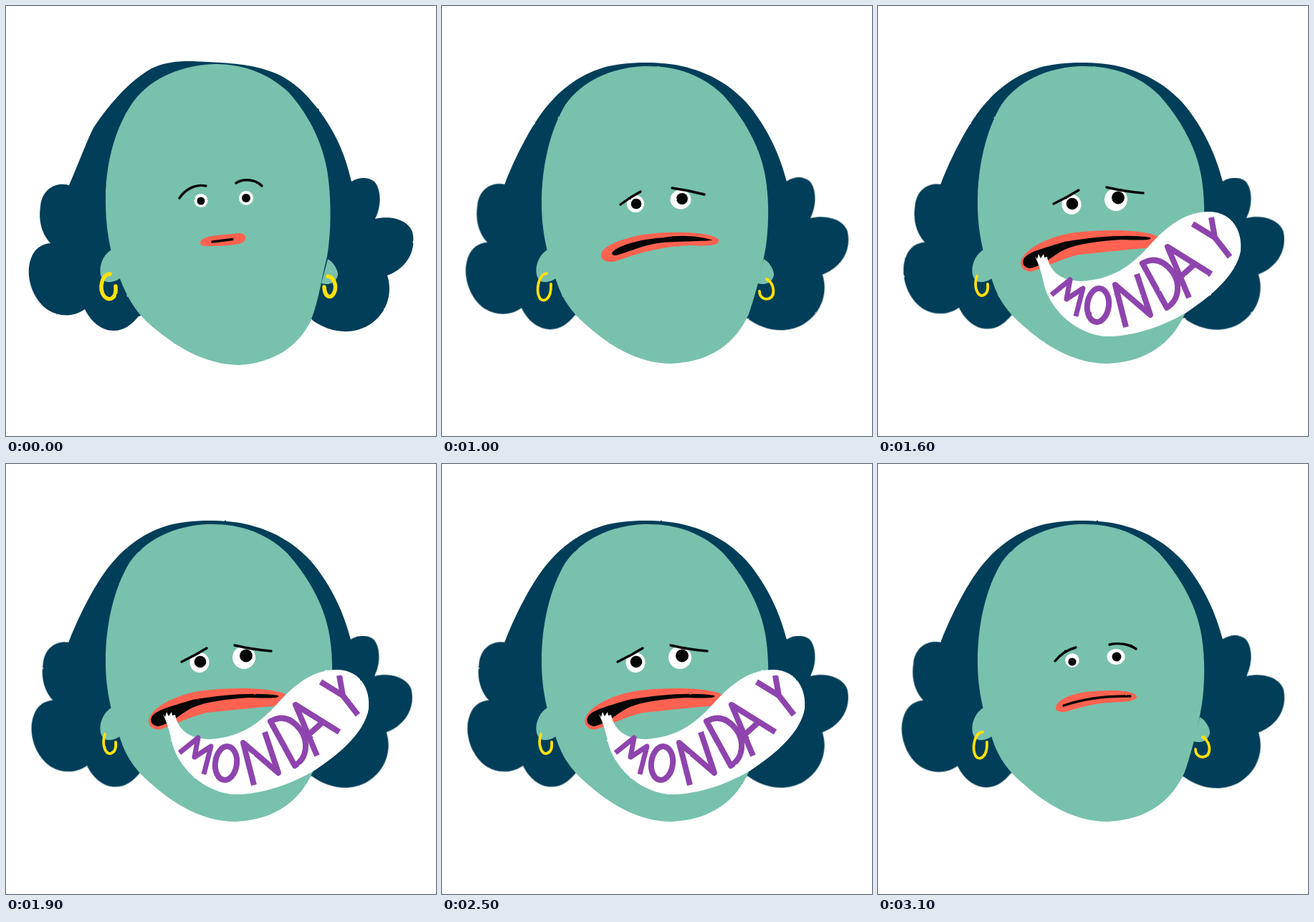
These frames come from a looping animation (600 px wide and 600 px high, 3200 ms). An HTML page without scripts:

```html
<!DOCTYPE html>
<html lang="en">
<head>
<meta charset="utf-8">
<title>Monday face</title>
<style>
  html, body { margin: 0; width: 100%; height: 100%; overflow: hidden; background: #fff; }
  svg { display: block; width: 100%; height: 100%; }

  .hair { fill: #003e59; }
  .skin { fill: #78c1ad; }
  .lips { fill: #ff6250; }
  .white { fill: #fff; }
  .ink { fill: #060606; }
  .line { fill: none; stroke: #060606; stroke-width: 3.4; stroke-linecap: round; }
  .ring { fill: none; stroke: #ffe10a; stroke-width: 3.8; stroke-linecap: round; }
  .thick { stroke-width: 5.5; }
  .letters { fill: none; stroke: #8e44ad; stroke-width: 8; stroke-linejoin: round; }

  /* 32 drawings of 100 ms make one loop */
  .calm, .uneasy, .sad, .talk, .worn, .bubble, .curls { animation: 3.2s step-end infinite; }
  .calm { animation-name: calm; }
  .worn { animation-name: worn; }
  .uneasy { animation-name: uneasy; }
  .sad { animation-name: sad; }
  .talk { animation-name: talk; }
  .bubble { animation-name: blow; transform-origin: 224px 352px; }
  .curls { animation-name: tuck; transform-origin: 300px 300px; }
  .boil { animation: boil .2s step-end infinite; }

  @keyframes calm { 0% { visibility: visible } 28.125%, 100% { visibility: hidden } }
  @keyframes worn { 0% { visibility: hidden } 28.125%, 100% { visibility: visible } }
  @keyframes uneasy {
    0%, 31.25% { visibility: hidden }
    28.125%, 96.875%, 100% { visibility: visible }
  }
  @keyframes sad {
    0%, 34.375%, 96.875%, 100% { visibility: hidden }
    31.25%, 93.75% { visibility: visible }
  }
  @keyframes talk {
    0%, 93.75%, 100% { visibility: hidden }
    34.375% { visibility: visible }
  }
  @keyframes blow {
    0%, 90.625%, 100% { transform: scale(.3) }
    37.5%, 87.5% { transform: scale(.7) }
    40.625% { transform: none }
  }
  @keyframes tuck {
    0%, 100% { transform: none }
    28.125%, 93.75% { transform: translateY(-1px) scale(.995) }
    34.375% { transform: translate(1px, -1px) scale(.99) }
  }
  @keyframes boil {
    0%, 100% { filter: url(#rough1) }
    50% { filter: url(#rough2) }
  }
</style>
</head>
<body>
<svg viewBox="0 0 600 600">
  <defs>
    <filter id="rough1" filterUnits="userSpaceOnUse" x="0" y="0" width="600" height="600" color-interpolation-filters="sRGB">
      <feTurbulence type="fractalNoise" baseFrequency=".12" numOctaves="2" seed="4"/>
      <feDisplacementMap in="SourceGraphic" scale="1.6" xChannelSelector="R" yChannelSelector="G"/>
    </filter>
    <filter id="rough2" filterUnits="userSpaceOnUse" x="0" y="0" width="600" height="600" color-interpolation-filters="sRGB">
      <feTurbulence type="fractalNoise" baseFrequency=".12" numOctaves="2" seed="11"/>
      <feDisplacementMap in="SourceGraphic" scale="1.6" xChannelSelector="R" yChannelSelector="G"/>
    </filter>
  </defs>

  <g class="boil">
    <!-- hair -->
    <path class="hair curls" d="M88 250C70 245 50 255 48 280C45 300 50 318 62 331C50 332 40 338 35 352C26 375 36 410 60 425C75 434 95 434 110 423C118 440 133 453 150 453C165 453 175 445 185 433L300 400L427 438C450 455 480 460 505 446C532 430 540 400 532 376C555 368 574 345 567 315C560 297 535 292 515 297C524 280 524 256 514 245C505 238 492 239 482 245Z"/>
    <path class="hair calm" d="M88 250C95 235 112 190 122 170C140 143 165 112 195 92C215 79 235 77 260 77L300 79C340 82 360 86 385 98C410 112 425 130 440 150C465 185 475 215 482 245L482 260H88Z"/>
    <path class="hair worn" d="M87 250C96 225 115 185 133 158C160 118 190 97 225 86C255 77 305 77 335 84C370 92 400 108 425 135C455 170 472 210 481 245L481 260H87Z"/>

    <!-- head -->
    <path class="skin" d="M147 340C128 352 127 382 141 385C150 386 157 382 161 378L180 350ZM449 353C458 358 464 370 463 376C460 387 450 390 440 387Z"/>
    <path class="skin calm" d="M293 81C250 82 205 97 178 133C160 158 139 205 139 270C139 315 146 345 158 378C168 405 180 425 198 442C235 474 275 500 325 501C375 498 408 474 425 440C437 410 440 380 448 350C454 315 454 270 449 235C443 195 425 155 395 121C370 97 335 81 293 81Z"/>
    <path class="skin worn" d="M282 84C235 86 195 105 172 138C150 175 139 225 139 275C139 318 148 350 160 385C168 410 182 428 199 443C232 473 273 499 320 499C375 497 410 470 428 430C438 400 446 370 452 335C457 300 456 260 450 232C443 195 420 155 392 124C362 95 325 83 282 84Z"/>

    <g class="calm">
      <path class="ring thick" d="M145 374C134 374 129 394 137 405C144 413 155 408 153 391M449 377C457 378 461 388 459 397C456 409 445 409 444 392"/>
      <circle class="white" cx="272" cy="271.500" r="9.500"/>
      <circle class="white" cx="335" cy="268" r="10"/>
      <circle class="ink" cx="272" cy="272" r="5.500"/>
      <circle class="ink" cx="335" cy="268" r="6"/>
      <path class="line" d="M242 268C250 256 264 248 279 251M321 247C332 240 348 242 357 251"/>
      <path class="lips" d="M271 330C272 324 282 321 295 320L325 317C337 317 337 328 328 331C315 335 290 335 280 335C273 335 271 333 271 330Z"/>
      <path class="line" d="M288 329L316 325.500"/>
    </g>

    <g class="uneasy">
      <path class="ring" d="M146 374C134 375 131 397 136 407C141 415 153 410 152 388M453 381C462 386 465 398 460 406C453 412 443 408 443 398"/>
      <circle class="white" cx="271" cy="274" r="9.800"/>
      <ellipse class="white" cx="332" cy="269" rx="12.500" ry="11"/>
      <circle class="ink" cx="271" cy="276" r="5.600"/>
      <circle class="ink" cx="333" cy="269" r="6.500"/>
      <path class="line" d="M247 275Q258 261 276 256M323 252C335 249 350 251 360 258"/>
      <path class="lips" d="M248 340C249 330 265 322 290 318C320 315 355 314 361 324C362 332 340 332 320 333C295 335 275 342 260 346C251 346 248 344 248 340Z"/>
      <path class="line" d="M259 337Q300 323 352 324"/>
    </g>

    <g class="sad">
      <path class="ring" d="M146 373C134 375 131 397 136 407C141 415 153 410 152 388M453 381C462 386 465 398 460 406C453 412 443 408 443 398"/>
      <circle class="white" cx="270" cy="276" r="12"/>
      <ellipse class="white" cx="333" cy="270" rx="14.500" ry="13.500"/>
      <circle class="ink" cx="271" cy="276" r="7.300"/>
      <circle class="ink" cx="335" cy="269" r="8"/>
      <path class="line" d="M249 277Q262 267 277 259M321 254Q344 257 366 263"/>
      <path class="lips" d="M222 348C222 335 250 325 280 319C320 313 378 315 386 326C388 335 370 335 345 334C310 335 280 343 245 355C232 360 222 355 222 348Z"/>
      <path class="ink" d="M238 343C250 332 280 325 310 323C335 318 365 322 378 327C350 329 315 328 295 332C275 336 255 345 243 348C238 348 236 346 238 343Z"/>
    </g>

    <g class="talk">
      <path class="ring" d="M138 377C133 392 139 405 146 404C152 402 154 396 153 388M452 381C460 386 463 396 458 402C452 407 444 404 444 397"/>
      <ellipse class="white" cx="270" cy="277" rx="13.500" ry="14"/>
      <circle class="white" cx="332" cy="270" r="16"/>
      <circle class="ink" cx="271" cy="276" r="8.300"/>
      <circle class="ink" cx="335" cy="267.500" r="9"/>
      <path class="line" d="M245 276Q264 267 280 257M319 253Q345 259 370 261"/>
      <path class="lips" d="M199 358C202 340 235 322 275 316C320 311 365 312 388 320C396 328 393 335 383 337C355 339 310 344 280 347C255 353 235 364 216 370C206 372 199 366 199 358Z"/>
      <path class="ink" d="M203 354C207 343 235 337 260 329C300 322 350 318 380 323C383 327 370 327 340 326C310 328 280 331 260 340C245 347 232 362 212 366C204 365 201 360 203 354Z"/>
      <g class="bubble" role="img" aria-label="MONDAY">
        <path class="white" d="M219 349l3 4l2-7l3 6l4-6l1 5l4-1C240 370 255 384 285 384C325 381 350 366 378 335C405 305 430 287 463 287C495 288 509 315 506 342C500 375 465 405 430 428C395 448 355 462 315 461C270 455 240 420 232 390C228 372 225 362 219 349Z"/>
        <g class="letters">
          <path stroke-width="7" d="M242 403L268 382L263 409L286 394L276 433"/>
          <ellipse cx="307" cy="417.500" rx="15" ry="23.500" transform="rotate(7 307 417.500)"/>
          <path d="M346 448L331 389L380 431L361 374"/>
          <path d="M369 359L403 421C421 410 422 387 411 371C399 355 385 350 369 359Z"/>
          <path d="M434 407L404 336L465 374M422 378L442 360"/>
          <path d="M439 304L470 323L465 295M470 323L491 350"/>
        </g>
      </g>
    </g>
  </g>
</svg>
</body>
</html>
```
